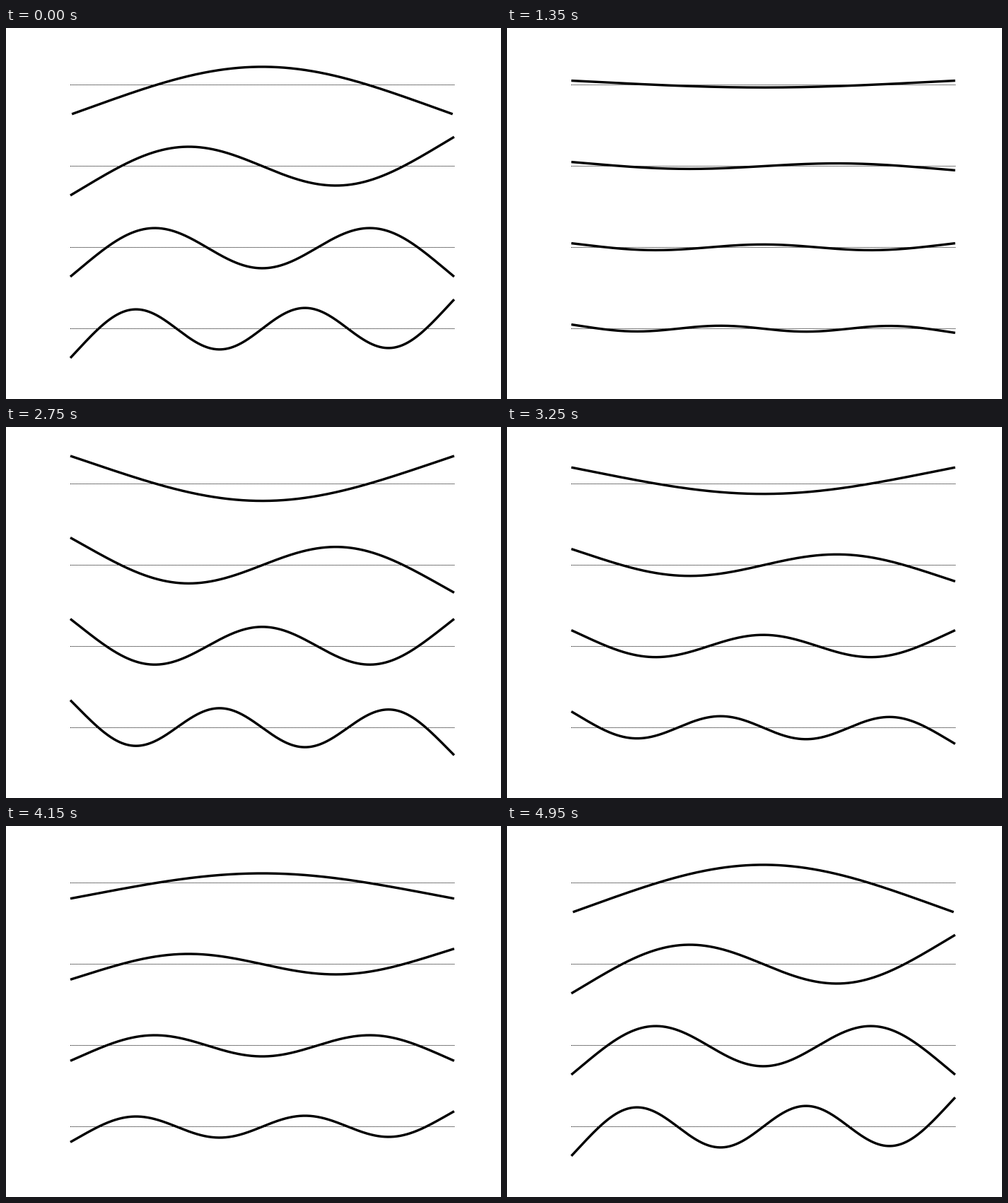
Animation, 700 px wide and 525 px high, one loop 5000 ms. Source, as a matplotlib script:

```python
import numpy as np
import matplotlib.pyplot as plt
from matplotlib.animation import FuncAnimation

# Vibration modes of a free-free beam, drawn in pixel coordinates.
WIDTH, HEIGHT, DPI = 700, 525, 100
PX = 72 / DPI
FRAMES, INTERVAL = 100, 50
LEFT, RIGHT = 91, 633.8
LIMIT = 41.4  # half the height of one panel

# (wave number times length, centre line, tip amplitude)
MODES = [
    (4.730041, 80.5, 42.1),
    (7.853205, 195.5, 41.4),
    (10.995608, 310.5, 41.4),
    (14.137165, 425.5, 41.4),
]


def mode_shape(k, s, symmetric):
    """Deflection along s in [-0.5, 0.5], equal to 1 at the left tip."""
    if symmetric:
        return (np.cos(k * s) / np.cos(k / 2) + np.cosh(k * s) / np.cosh(k / 2)) / 2
    return -(np.sin(k * s) / np.sin(k / 2) + np.sinh(k * s) / np.sinh(k / 2)) / 2


fig = plt.figure(figsize=(WIDTH / DPI, HEIGHT / DPI), dpi=DPI, facecolor="white")
ax = fig.add_axes([0, 0, 1, 1])
ax.set_xlim(0, WIDTH)
ax.set_ylim(HEIGHT, 0)
ax.axis("off")

s = np.linspace(-0.5, 0.5, 1001)
x = LEFT + (s + 0.5) * (RIGHT - LEFT)

beams = []
for i, (k, base, amp) in enumerate(MODES):
    ax.plot([LEFT, 634], [base, base], color="black", lw=PX, ls=(0, (1, 2)),
            dash_capstyle="butt", antialiased=False, snap=False, zorder=1)
    line, = ax.plot([], [], color="black", lw=3.4 * PX, snap=False,
                    solid_capstyle="butt", solid_joinstyle="round", zorder=2)
    beams.append((line, base, amp * mode_shape(k, s, i % 2 == 0)))


def update(frame):
    swing = np.cos(2 * np.pi * frame / (FRAMES - 1))
    for line, base, shape in beams:
        y = swing * shape
        inside = np.abs(y) <= LIMIT + 1e-3
        line.set_data(x[inside], base + y[inside])
    return [line for line, _, _ in beams]


anim = FuncAnimation(fig, update, frames=FRAMES, interval=INTERVAL,
                     repeat=True, repeat_delay=0, blit=False)
plt.show()
```
